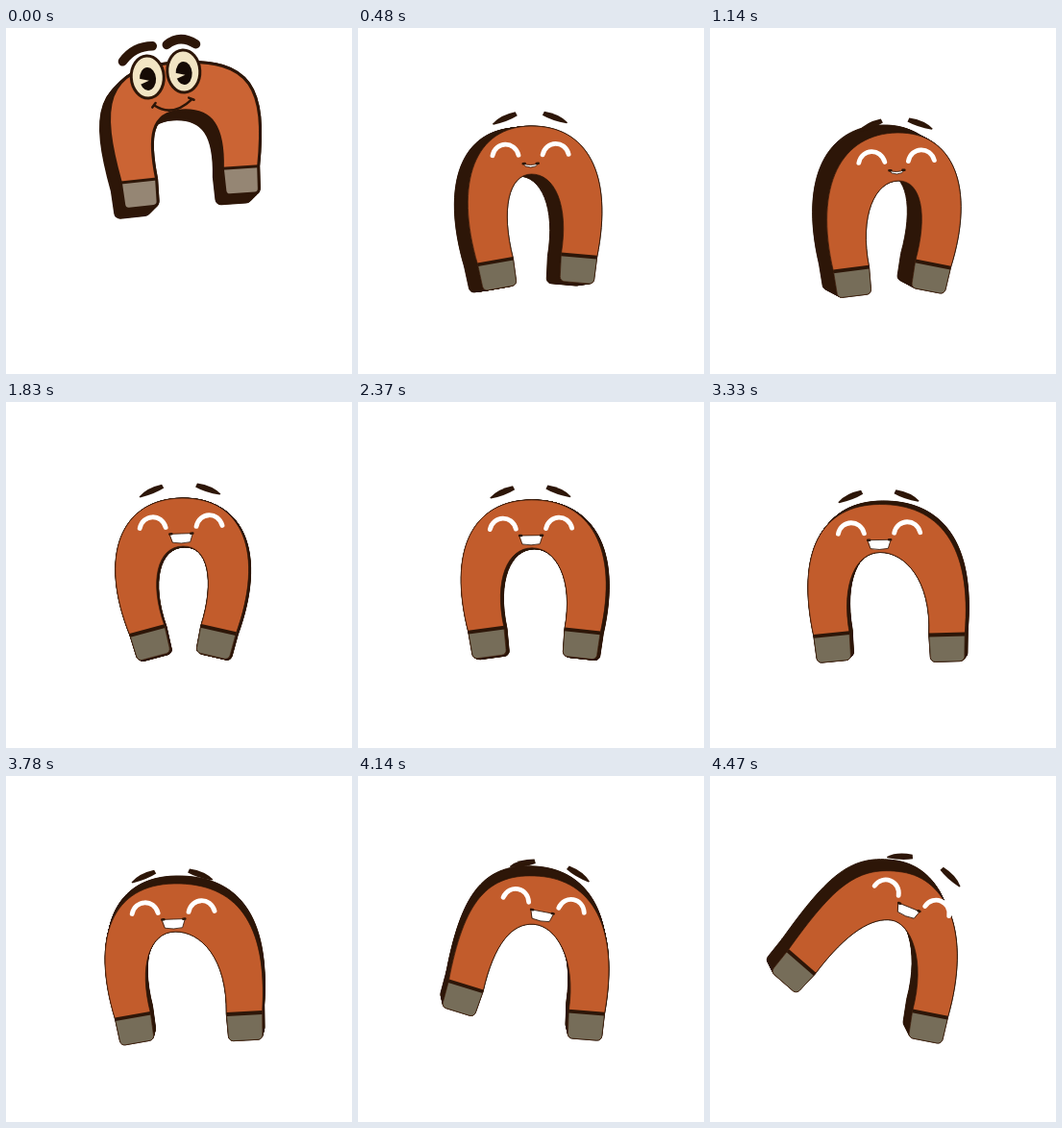
Recreate the animation shown at these times as an HTML page with a canvas. Size 360 by 360 pixels, loop 4.5 s.

```html
<!DOCTYPE html>
<html>
<head>
<meta charset="utf-8">
<style>
  html, body { margin: 0; width: 100%; height: 100%; overflow: hidden; background: #fff; }
  canvas { display: block; width: 100vmin; height: 100vmin; }
</style>
</head>
<body>
<canvas id="stage" width="360" height="360"></canvas>
<script>
const ctx = document.getElementById('stage').getContext('2d');
const LOOP = 4500, STEP = 30, FALL = 180, AWAKE = 150, LAUGH = 330;
const HALF_LEG = 18.7, FOOT = 28, THICKNESS = 50;
const DARK = '#2d1608', CREAM = '#f2e5c4';

// Key poses: legs are [seam x, seam y, degrees], top is the crown of the arch,
// depth is where the back side lies, tilt turns the face
const poses = [
  { at: 0,    left: [138, 159, -6],  right: [244, 145, -4], top: [178, 36],  depth: [-9, 9],   tilt: -9, round: 1.35 },
  { at: 480,  left: [143, 243, -10], right: [230, 237, 5],  top: [180, 102], depth: [-14, 2],  tilt: -1, round: 1 },
  { at: 1140, left: [147, 251, -7],  right: [232, 246, 11], top: [195, 109], depth: [-15, -8], tilt: -2, round: 1 },
  { at: 1830, left: [147, 238, -15], right: [221, 237, 13], top: [183, 100], depth: [2, 1],    tilt: -2, round: 1.1 },
  { at: 2880, left: [121, 234, -1],  right: [245, 237, 0],  top: [178, 101], depth: [4, 1],    tilt: 0,  round: 1 },
  { at: 3780, left: [132, 250, -10], right: [248, 247, -3], top: [175, 112], depth: [2, -8],   tilt: -2, round: 1.1 },
  { at: 4470, left: [95, 194, 41],   right: [229, 248, 11], top: [200, 100], depth: [-6, -12], tilt: 22, round: 0.8 }
];

const clamp = v => Math.max(0, Math.min(1, v));
const rad = deg => deg * Math.PI / 180;
const mix = (a, b, k) => Array.isArray(a) ? a.map((v, i) => mix(v, b[i], k)) : a + (b - a) * k;

function poseAt(t) {
  const next = Math.max(1, poses.findIndex(p => p.at > t));
  const i = t >= poses.at(-1).at ? poses.length - 2 : next - 1;
  const a = poses[i], b = poses[i + 1], span = b.at - a.at;
  const u = clamp((t - a.at) / span);
  const k = i ? (1 - Math.cos(Math.PI * u)) / 2 : clamp(t / FALL) ** 2;
  const bob = i
    ? -5 * Math.sin(2 * Math.PI * Math.round(span / LAUGH) * u)
    : 15 * Math.sin(Math.PI * clamp((t - FALL / 2) / (span - FALL / 2)));
  const pose = {};
  for (const key in a) pose[key] = mix(a[key], b[key], k);
  for (const key of ['left', 'right', 'top']) pose[key][1] += bob;
  return pose;
}

// Point in a leg's own axes: across the seam and down the leg
function onLeg([x, y, deg], across, down) {
  const c = Math.cos(rad(deg)), s = Math.sin(rad(deg));
  return [x + across * c - down * s, y + across * s + down * c];
}

function build({ left, right, top, tilt, round }) {
  const body = new Path2D(), feet = [], seams = [];
  const arch = [top[0] - tilt / 2, top[1] + THICKNESS];

  // Half of the horseshoe curve, as control points from seam to crown
  const half = (leg, side, edge, crown, bulge, shoulder) => {
    const start = onLeg(leg, side * edge, 0);
    const reach = 0.58 * Math.hypot(start[0] - crown[0], start[1] - crown[1]);
    return [start, onLeg(leg, side * (edge + bulge), -reach),
      [crown[0] + side * shoulder, crown[1] + side * shoulder * Math.sin(rad(tilt * 0.4))], crown];
  };
  const span = (from, to) => {
    body.bezierCurveTo(...from[1], ...from[2], ...from[3]);
    body.bezierCurveTo(...to[2], ...to[1], ...to[0]);
  };
  const footEdge = (path, leg, from) => {
    const corner = s => onLeg(leg, s * HALF_LEG * 0.94, FOOT);
    path.arcTo(...corner(from), ...corner(-from), 5);
    path.arcTo(...corner(-from), ...onLeg(leg, -from * HALF_LEG, 0), 5);
    path.lineTo(...onLeg(leg, -from * HALF_LEG, 0));
  };
  const outer = (leg, side) => half(leg, side, HALF_LEG, top, 10 * round, 58 * round);
  const inner = (leg, side) => half(leg, side, -HALF_LEG, arch, 4, 24 * round);

  body.moveTo(...outer(left, -1)[0]);
  span(outer(left, -1), outer(right, 1));
  footEdge(body, right, 1);
  span(inner(right, 1), inner(left, -1));
  footEdge(body, left, 1);
  body.closePath();

  for (const leg of [left, right]) {
    const foot = new Path2D(), seam = new Path2D();
    for (const path of [foot, seam]) path.moveTo(...onLeg(leg, HALF_LEG, 0));
    footEdge(foot, leg, 1);
    seam.lineTo(...onLeg(leg, -HALF_LEG, 0));
    feet.push(foot);
    seams.push(seam);
  }
  return { body, feet, seams };
}

function fill(path, color) {
  ctx.fillStyle = color;
  ctx.fill(path);
}

function stroke(path, color, width) {
  ctx.strokeStyle = color;
  ctx.lineWidth = width;
  ctx.stroke(typeof path === 'string' ? new Path2D(path) : path);
}

function openFace() {
  ctx.translate(-5, -19);
  for (const side of [-1, 1]) {
    ctx.save();
    ctx.translate(side * 19, 0);
    const eye = new Path2D(), pupil = new Path2D();
    eye.ellipse(0, 0, 17, 22, 0.1, 0, 7);
    pupil.ellipse(0, 2, 8.5, 12, 0.1, 0, 7);
    fill(eye, CREAM);
    stroke(eye, DARK, 3);
    fill(pupil, '#160b05');
    fill(new Path2D('M1 4L-10 0V7Z'), CREAM);
    ctx.restore();
  }
  stroke('M-42-20Q-28-34-9-31M6-30Q21-39 36-26', DARK, 9.5);
  stroke('M-17 30Q0 46 23 30M-19 32L-15 28M20 28L25 31', DARK, 2.5);
}

function laughFace(gap, open) {
  for (const side of [-1, 1]) {
    ctx.save();
    ctx.translate(side * gap, 0);
    stroke('M-13.5 0C-10-15 10-15 13.5 0', '#fff', 4.8);
    ctx.scale(-side, 1);
    fill(new Path2D('M-13-33Q-5-42 11-45L13-41Q3-35-12-32Z'), DARK);
    ctx.restore();
  }
  const w = mix(8, 12, open), lip = mix(9, 7, open), sag = mix(12, 7, open), low = mix(12, 16, open);
  const mouth = new Path2D(
    `M${-w} ${lip}Q0 ${sag} ${w} ${lip}L${w - 3} ${low}Q0 ${low + 2} ${3 - w} ${low}Z`);
  fill(mouth, '#fff');
  stroke(mouth, DARK, 0.8);
  stroke(`M${-w} ${lip}h2M${w} ${lip}h-2`, DARK, 2.5);
}

function draw(t) {
  const pose = poseAt(t), { body, feet, seams } = build(pose);
  const awake = t < AWAKE, [dx, dy] = pose.depth, layers = 16;
  fill(new Path2D('M0 0H360V360H0Z'), '#fff');
  ctx.lineCap = ctx.lineJoin = 'round';
  for (let i = 0; i <= layers; i++) {
    ctx.save();
    ctx.translate(dx * i / layers, dy * i / layers);
    fill(body, DARK);
    stroke(body, DARK, awake ? 3 : 1);
    ctx.restore();
  }
  fill(body, awake ? '#cb6434' : '#c25c2c');
  feet.forEach(foot => fill(foot, awake ? '#958674' : '#766d59'));
  stroke(body, DARK, awake ? 3 : 0.7);
  ctx.lineCap = 'butt';
  seams.forEach(seam => stroke(seam, DARK, awake ? 3 : 3.8));
  ctx.lineCap = 'round';
  ctx.save();
  ctx.translate(pose.top[0] + pose.tilt * 0.45, pose.top[1] + 30);
  ctx.rotate(rad(pose.tilt));
  // The eyes draw together as the head turns aside
  if (awake) openFace();
  else laughFace(30 - 0.28 * Math.abs(dx), clamp((t - 1300) / 400));
  ctx.restore();
}

function tick() {
  const t = performance.now() % LOOP;
  draw(Math.floor(t / STEP) * STEP);
  requestAnimationFrame(tick);
}
tick();
</script>
</body>
</html>
```
